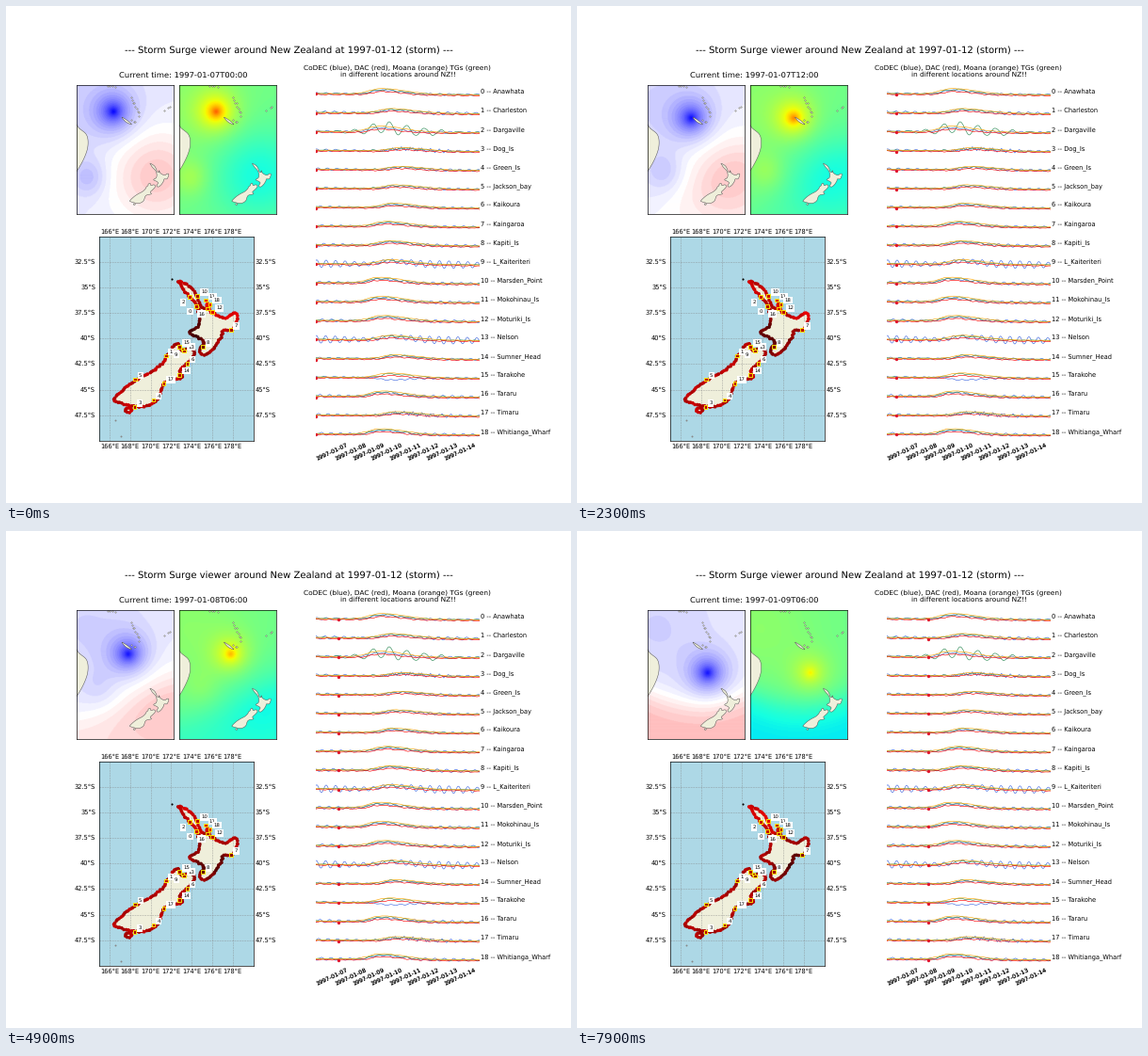
Write a matplotlib script that moves like this. It is 600x528 px and loops after 8000 ms.

```python
import numpy as np
import matplotlib.pyplot as plt
from matplotlib.animation import FuncAnimation

plt.rcParams["text.hinting"] = "none"

W, H = 600, 528
FRAMES, INTERVAL = 80, 100
STEPS_PER_FRAME = 0.12          # one six-hour step lasts 0.83 s
LAST_STEP = 9
LAND, EDGE = "#efefdb", "#555555"

rng = np.random.default_rng(7)
fig = plt.figure(figsize=(W / 60, H / 60), dpi=60, facecolor="white")


def panel(x0, y0, x1, y1, xlim, ylim, frame=True):
    """Axes placed by pixel box, origin at the top left."""
    ax = fig.add_axes([x0 / W, 1 - y1 / H, (x1 - x0) / W, (y1 - y0) / H])
    ax.set(xlim=xlim, ylim=ylim, xticks=[], yticks=[], autoscale_on=False)
    ax.patch.set_visible(False)
    if not frame:
        ax.axis("off")
    return ax


page = panel(0, 0, W, H, (0, W), (H, 0), frame=False)
page.set_zorder(10)


def label(x, y, text, size=8, ha="center", va="baseline", **kw):
    return page.text(x, y, text, fontsize=size, ha=ha, va=va, **kw)


# ---------------------------------------------------------------- geography
def smooth(points, n=8):
    """Closed Catmull-Rom curve through the points."""
    p1 = np.array(points, float)[:, None]
    p0, p2, p3 = (np.roll(p1, k, axis=0) for k in (1, -1, -2))
    s = np.linspace(0, 1, n, endpoint=False)[None, :, None]
    curve = (2 * p1 + (p2 - p0) * s + (2 * p0 - 5 * p1 + 4 * p2 - p3) * s ** 2
             + (3 * p1 - p0 - 3 * p2 + p3) * s ** 3) / 2
    return curve.reshape(-1, 2)


def resample(shape, gap=0.19):
    ring = np.vstack([shape, shape[:1]])
    dist = np.r_[0, np.cumsum(np.hypot(*np.diff(ring, axis=0).T))]
    at = np.arange(0, dist[-1], gap)
    return np.c_[np.interp(at, dist, ring[:, 0]),
                 np.interp(at, dist, ring[:, 1])]


NORTH = smooth([
    (172.7, -34.45), (173.1, -34.5), (174.1, -35.2), (174.7, -36.3),
    (174.9, -36.9), (175.45, -37.1), (175.5, -36.55), (175.95, -37.4),
    (177.2, -38.0), (178.0, -37.55), (178.5, -37.75), (178.0, -39.1),
    (177.1, -39.2), (176.9, -39.8), (176.2, -40.9), (175.3, -41.6),
    (174.75, -41.25), (175.2, -40.4), (174.7, -39.9), (173.8, -39.4),
    (174.6, -38.8), (174.8, -37.8), (174.4, -36.6), (173.4, -35.5),
    (173.0, -34.85)])
SOUTH = smooth([
    (172.7, -40.5), (173.0, -41.15), (173.8, -40.95), (174.25, -41.2),
    (174.2, -41.75), (173.5, -42.5), (172.8, -43.2), (173.1, -43.8),
    (171.8, -44.1), (171.2, -44.6), (170.7, -45.9), (169.6, -46.6),
    (168.3, -46.6), (166.8, -46.2), (166.5, -45.85), (167.8, -44.6),
    (169.0, -43.8), (170.4, -43.05), (171.3, -42.2), (171.6, -41.6),
    (172.1, -41.2), (172.15, -40.8)])
ANGLE = np.linspace(0, 2 * np.pi, 12, endpoint=False)
STEWART = np.c_[167.85 + 0.3 * np.cos(ANGLE), -46.97 + 0.22 * np.sin(ANGLE)]
AUSTRALIA = smooth([(148, -21), (150.8, -23.5), (153.1, -25.6), (153.5, -28.8),
                    (152.5, -32.3), (150.2, -36.5), (148, -38.5)])
CALEDONIA = smooth([(164.0, -20.1), (165.7, -21.1), (167.0, -22.3),
                    (165.3, -21.6)])


def islets(start, end, n):
    return np.linspace(start, end, n) + rng.normal(0, 0.25, (n, 2))


ISLETS = np.vstack([islets((166.8, -14), (169.5, -19.5), 9),
                    islets((160, -10.2), (162, -10.8), 4),
                    islets((177.6, -18), (179.2, -16.6), 3),
                    islets((167, -20.8), (168, -21.6), 3)])


def draw_land(ax, shapes, lw):
    for shape in shapes:
        ax.fill(*shape.T, fc=LAND, ec=EDGE, lw=lw, zorder=2)


# ------------------------------------------------------------ weather fields
MINI = (150, 180), (-50, -10)
U, V = np.meshgrid(np.linspace(0, 1, 206), np.linspace(0, 1, 275))
TRACK = np.array([(0, 0.38, 0.21), (3, 0.485, 0.285), (6, 0.555, 0.375),
                  (8, 0.60, 0.45), (9, 0.62, 0.49)])


def blob(cu, cv, su, sv):
    return np.exp(-((U - cu) / su) ** 2 - ((V - cv) / sv) ** 2)


def pressure(step):
    """Background pressure and the storm's dip, both in -1..1."""
    a = step / LAST_STEP
    cu, cv = (np.interp(step, TRACK[:, 0], TRACK[:, k]) for k in (1, 2))
    r = np.sqrt(((U - cu) * 0.75) ** 2 + (V - cv) ** 2 + 1e-4)
    dip = -0.65 * np.exp(-r / 0.055) - 0.28 * np.exp(-(r / 0.17) ** 2)
    ridge = (0.7 - 0.68 * (1 - a) * (U - 0.5) - 0.35 * a * (U - 0.55) ** 2)
    back = -0.08 - 0.1 * blob(0.1, 0.15, 0.6, 0.45)
    back += (1 - a) * 0.3 * blob(0.82, 0.7, 0.46, 0.34)
    back -= (1 - a) * 0.18 * blob(0.12 + 0.2 * a, 0.72 - 0.22 * a, 0.18, 0.14)
    back += a * 0.36 / (1 + np.exp((ridge - V) / 0.07 + 0.8))
    return back, dip


def make_mini(x0, cmap, lo, hi):
    ax = panel(x0, 83.5, x0 + 103, 221, *MINI)
    img = ax.imshow(np.zeros_like(U), extent=MINI[0] + MINI[1], aspect="auto",
                    cmap=cmap, vmin=lo, vmax=hi, zorder=1)
    draw_land(ax, (AUSTRALIA, CALEDONIA, NORTH, SOUTH, STEWART), 0.6)
    ax.plot(*ISLETS.T, "o", ms=1.6, mfc=LAND, mec=EDGE, mew=0.5, zorder=2)
    ax.set(xlim=MINI[0], ylim=MINI[1])
    return img


left_img = make_mini(75, "bwr", -1, 1)
right_img = make_mini(183.5, "jet", 0, 1)

# ----------------------------------------------------------------- coast map
big = panel(99, 244.5, 262.5, 462, (165, 180), (-50, -30))
big.patch.set(visible=True, facecolor="lightblue")
draw_land(big, (NORTH, SOUTH, STEWART), 0.6)
big.plot([172.1], [-34.15], "o", ms=1.5, color="black")
big.plot([166.55, 167.15], [-47.95, -49.5], "o", ms=1.3, color="#888888")


def map_x(lon):
    return 99 + 10.9 * (lon - 165)


def map_y(lat):
    return 244.5 - 10.875 * (lat + 30)


GRID = dict(color="gray", lw=0.6, ls="--", alpha=0.7, zorder=2.5)
for lon in range(166, 180, 2):
    big.axvline(lon, **GRID)
    for y in (242, 470):
        label(map_x(lon), y, f"{lon}°E")
for lat in np.arange(32.5, 48, 2.5):
    big.axhline(-lat, **GRID)
    text = f"{lat:g}°S"
    label(95, map_y(-lat), text, ha="right", va="center")
    label(264.5, map_y(-lat), text, ha="left", va="center")

STATIONS = {
    "Anawhata": (174.45, -36.85), "Charleston": (171.5, -41.7),
    "Dargaville": (173.8, -35.95), "Dog_Is": (168.45, -46.7),
    "Green_Is": (170.3, -46.0), "Jackson_bay": (168.5, -44.0),
    "Kaikoura": (173.6, -42.45), "Kaingaroa": (177.85, -39.15),
    "Kapiti_Is": (175.1, -40.8), "L_Kaiteriteri": (173.1, -41.05),
    "Marsden_Point": (174.55, -35.85), "Mokohinau_Is": (175.35, -36.25),
    "Moturiki_Is": (176.0, -37.4), "Nelson": (173.25, -41.2),
    "Sumner_Head": (172.8, -43.55), "Tarakohe": (172.8, -40.8),
    "Tararu": (175.55, -37.1), "Timaru": (171.3, -44.4),
    "Whitianga_Wharf": (175.8, -36.65)}
TAG_BELOW = {"Anawhata", "Dargaville", "L_Kaiteriteri", "Tararu"}
SITES = np.array(list(STATIONS.values()))
COAST = np.vstack([resample(s) for s in (NORTH, SOUTH, STEWART)])
COAST += rng.normal(0, 0.035, COAST.shape)


def surge_colour(pts, step):
    a = step / LAST_STEP
    lon, lat = pts.T
    near = np.hypot(lon - 174.6 - 2.4 * a, lat + 39.4 + 0.8 * a) / 1.8
    v = 0.27 - 0.03 * a - (0.18 - 0.05 * a) * np.exp(-near ** 2)
    v += 0.06 * a * (lat > -37)
    v += 0.06 * (1 - a) * ((lon > 175.3) & (lat > -39))
    v += 0.025 * np.sin(5 * lon + 3 * lat + step)
    return plt.cm.hot(np.clip(v, 0.02, 0.34))


shore = big.scatter(*COAST.T, s=19, lw=0, zorder=3)
sites = big.scatter(*SITES.T, s=17, marker="s", edgecolors="yellow",
                    linewidths=1, zorder=4)
for i, (name, (lon, lat)) in enumerate(STATIONS.items()):
    dx, dy = (-6.5, 5) if name in TAG_BELOW else (5.5 + 2 * (i > 9), -4.7)
    label(map_x(lon) + dx, map_y(lat) + dy, str(i), 6.5, va="center_baseline",
          bbox=dict(boxstyle="square,pad=0.25", fc="white", ec="none"))

# --------------------------------------------------------------- time series
X0, X1, DAY, ROW = 329, 503, 19.4, 20.08
TIDAL, NOISY = {"L_Kaiteriteri", "Nelson"}, {"Dog_Is", "Timaru"}

chart = panel(X0, 60, X1 + 0.5, 480, (X0, X1 + 0.5), (480, 60), frame=False)
t = np.linspace(0, (X1 - X0) / DAY, 330)
dots_y = []


def swell(peak, rise=0.7, fall=1.5):
    return np.exp(-((t - peak) / np.where(t < peak, rise, fall)) ** 2)


def wave(period, phase=0.0):
    return np.sin(2 * np.pi * t / period + phase)


for i, (name, (lon, lat)) in enumerate(STATIONS.items()):
    base = 93 + ROW * i
    peak = 3.5 + 0.11 * (-36 - lat)          # the surge reaches the south last
    amp = 3.6 + 0.25 * (lat + 46)            # and weakens on the way
    phase, tide = rng.uniform(0, 6), rng.uniform(1, 1.8)
    if name in TIDAL:
        tide = 4
    swing = 6 if name == "Dargaville" else 0.7
    gain = -0.5 if name == "Tarakohe" else 0.7
    bump, drift = swell(peak), -0.15 * t
    noise = 0.35 * wave(0.7, phase) + 0.25 * wave(0.37, 2 * phase)

    blue = gain * amp * bump + drift
    blue += tide * (0.75 + 0.25 * wave(7, 1.6)) * wave(0.517, phase)
    if name in NOISY:
        blue += 1.2 * wave(0.16) * swell(5, 1.5, 2.5)
    green = 0.8 * amp * bump + drift - noise
    green += swing * wave(0.95) * swell(4.1, 2, 2.8)
    red = 0.6 * amp * bump + drift - 0.9 + noise
    orange = amp * swell(peak, 0.9, 1.8) + drift + 0.5 * noise
    for curve, colour in ((blue, "royalblue"), (green, "seagreen"),
                          (red, "red"), (orange, "orange")):
        chart.plot(X0 + DAY * t, base - curve, color=colour, lw=0.75)
    dots_y.append(base - red)
    label(503.5, 92.9 + ROW * i, f"{i} -- {name}", ha="left")

dots_y = np.array(dots_y)
dots, = chart.plot([], [], "o", ms=4, color="#e0142a", mew=0, zorder=5)

for day in range(8):
    for _ in range(2):          # stacked labels look bold
        label(X0 + 1.5 + DAY * day, 482.8, f"1997-01-{day + 7:02d}", 7.5,
              ha="left", rotation=25, rotation_mode="anchor")

# ------------------------------------------------------------------- headings
label(300, 50, "--- Storm Surge viewer around New Zealand at 1997-01-12 "
               "(storm) ---", 12)
label(415, 67.3, "CoDEC (blue), DAC (red), Moana (orange) TGs (green)", 8.8)
label(417, 75, "in different locations around NZ!!", 8.8)
clock = label(188, 75.5, "", 10)


def update(n):
    step = int(n * STEPS_PER_FRAME + 1e-9)
    day, hour = divmod(6 * step, 24)
    clock.set_text(f"Current time: 1997-01-{7 + day:02d}T{hour:02d}:00")
    back, dip = pressure(step)
    left_img.set_data(np.round((back + dip) / 0.05) * 0.05)
    right_img.set_data(0.455 - 0.36 * (back + dip * (1 - 0.05 * step)))
    shore.set_facecolor(surge_colour(COAST, step))
    sites.set_facecolor(surge_colour(SITES, step))
    k = np.searchsorted(t, step / 4)
    dots.set_data(np.full(len(STATIONS), X0 + DAY * step / 4), dots_y[:, k])
    return left_img, right_img, shore, sites, dots, clock


anim = FuncAnimation(fig, update, frames=FRAMES, interval=INTERVAL,
                     repeat=True, repeat_delay=0)
plt.show()
```
